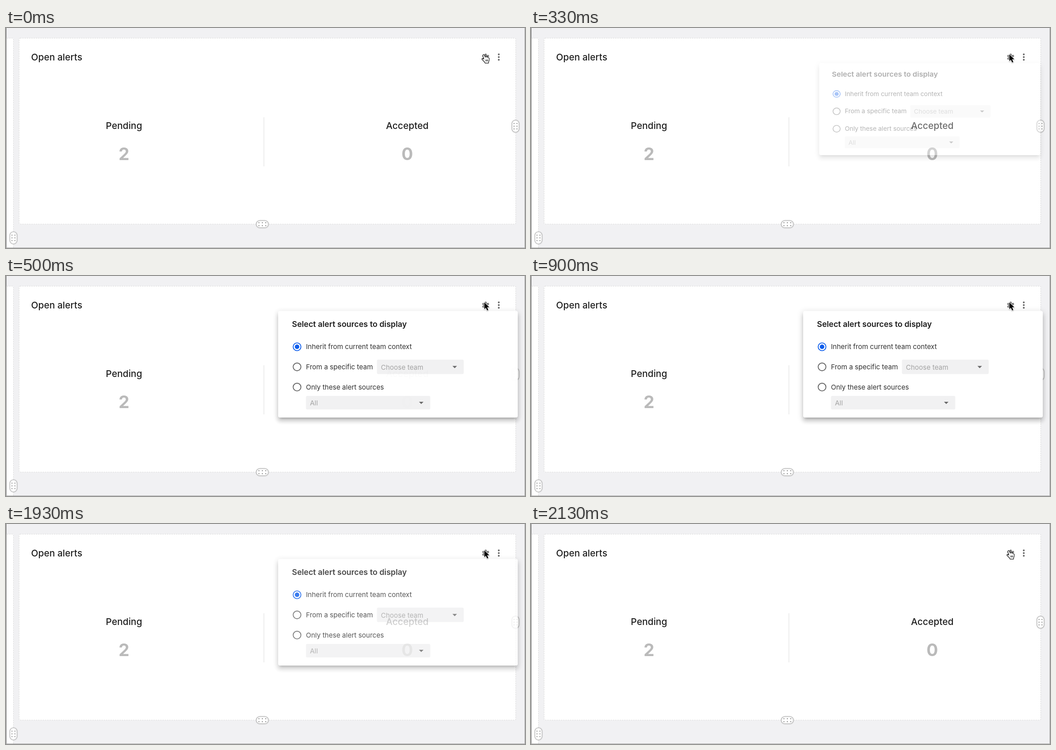
These frames come from a looping animation (1148x488 px, 2.43 s). An HTML page with a canvas:

```html
<!DOCTYPE html>
<html lang="en">
<head>
<meta charset="utf-8">
<title>Open alerts</title>
<style>
  html, body { margin: 0; width: 100%; height: 100%; overflow: hidden; background: #f1f1f3; }
  canvas { display: block; }
</style>
</head>
<body>
<canvas id="stage" width="1148" height="488"></canvas>
<script>
const W = 1148, H = 488, LOOP = 2430, TICK = 100 / 3;
const OPEN_AT = 247, CLOSE_AT = 1865, DURATION = 293;
const PANEL = { x: 602, y: 77.5, w: 530, h: 236.5 };
const ORIGIN = { x: 1061, y: 77.5 };

const stage = document.getElementById('stage').getContext('2d');
const layerCanvas = document.createElement('canvas');
layerCanvas.width = W;
layerCanvas.height = H;
const layer = layerCanvas.getContext('2d');

const clamp = v => Math.min(1, Math.max(0, v));

// cubic-bezier(.4, 0, .2, 1), solved by bisection
function ease(x) {
  x = clamp(x);
  let lo = 0, hi = 1;
  for (let i = 0; i < 24; i++) {
    const t = (lo + hi) / 2, u = 1 - t;
    if (1.2 * u * u * t + 0.6 * u * t * t + t * t * t < x) lo = t; else hi = t;
  }
  return lo * lo * (3 - 2 * lo);
}

function text(c, str, x, y, size, weight, color, align = 'left') {
  c.font = `${weight} ${size}px Inter, sans-serif`;
  c.textAlign = align;
  c.fillStyle = color;
  c.fillText(str, x, y);
}

function box(c, x, y, w, h, r, fill, stroke) {
  c.beginPath();
  c.roundRect(x, y, w, h, r);
  if (fill) { c.fillStyle = fill; c.fill(); }
  if (stroke) { c.strokeStyle = stroke; c.stroke(); }
}

function disc(c, x, y, r, fill) {
  c.beginPath();
  c.arc(x, y, r, 0, 2 * Math.PI);
  c.fillStyle = fill;
  c.fill();
}

function ring(c, x, y, r, width, color) {
  c.beginPath();
  c.arc(x, y, r, 0, 2 * Math.PI);
  c.lineWidth = width;
  c.strokeStyle = color;
  c.stroke();
}

function card(x, y, w, h) {
  stage.save();
  stage.lineWidth = 1;
  stage.setLineDash([3, 2]);
  box(stage, x, y, w, h, 2, '#fff', '#dadada');
  stage.restore();
}

function handle(x, y, cols, rows) {
  const upright = rows > cols, w = upright ? 16 : 27, h = upright ? 27 : 16;
  stage.save();
  stage.lineWidth = 1.2;
  stage.shadowColor = 'rgba(0,0,0,.2)';
  stage.shadowBlur = 2;
  box(stage, x - w / 2, y - h / 2, w, h, 8, '#fff', '#bdbdbd');
  stage.restore();
  const dx = upright ? 6.5 : 7.5, dy = upright ? 6 : 6.5;
  for (let i = 0; i < cols; i++)
    for (let j = 0; j < rows; j++)
      disc(stage, x + (i - (cols - 1) / 2) * dx, y + (j - (rows - 1) / 2) * dy, 1.1, '#777');
}

function gear(x, y) {
  stage.save();
  stage.translate(x, y);
  stage.fillStyle = '#777';
  for (let i = 0; i < 6; i++) {
    stage.rotate(Math.PI / 3);
    stage.fillRect(-2, -8, 4, 5);
  }
  ring(stage, 0, 0, 4.4, 3, '#777');
  stage.restore();
}

function drawBoard() {
  stage.fillStyle = '#f1f1f3';
  stage.fillRect(0, 0, W, H);
  card(-20, 22.5, 36.5, 500);
  card(29, 22.5, 1098.5, 412.5);
  stage.fillStyle = '#ddd';
  stage.fillRect(570, 198, 1, 109);

  text(stage, 'Open alerts', 55.5, 72.3, 20.5, 500, '#1f1f1f');
  text(stage, 'Pending', 261, 224, 20.5, 500, '#1f1f1f', 'center');
  text(stage, 'Accepted', 887.5, 224, 20.5, 500, '#1f1f1f', 'center');
  text(stage, '2', 261, 293, 38, 700, '#bababa', 'center');
  text(stage, '0', 887.5, 293, 38, 700, '#bababa', 'center');

  gear(1061, 65);
  for (const y of [58.5, 64.5, 70.5]) disc(stage, 1090, y, 2, '#666');
  handle(1127, 217.8, 2, 3);
  handle(567, 435.2, 3, 2);
  handle(16.5, 465.5, 2, 3);

  stage.fillStyle = '#6b6b6b';
  stage.fillRect(0, 0, 1, H);
  stage.fillStyle = '#a4a4a4';
  stage.fillRect(0, H - 1, W, 1);
  stage.fillRect(W - 1, 0, 1, H);
}

function panelShadow(dy, blur, spread, alpha) {
  layer.save();
  layer.shadowColor = `rgba(0,0,0,${alpha})`;
  layer.shadowBlur = blur;
  layer.shadowOffsetX = 3000;
  layer.shadowOffsetY = dy;
  layer.translate(-3000 / layer.getTransform().a, 0);
  box(layer, PANEL.x - spread, PANEL.y - spread, PANEL.w + 2 * spread, PANEL.h + 2 * spread, 4, '#000');
  layer.restore();
}

function radio(y, label, on) {
  ring(layer, 643.8, y, 8.6, 1.9, on ? '#0b5cec' : '#666');
  if (on) disc(layer, 643.8, y, 5, '#0b5cec');
  text(layer, label, 663.5, y + 5.3, 15, 400, '#2f2f2f');
}

function select(x, y, w, h, label, arrowX) {
  box(layer, x, y, w, h, 3, '#f1f1f2');
  const mid = y + h / 2;
  text(layer, label, x + 8.7, mid + 6, 15, 400, '#a3a3a3');
  layer.beginPath();
  layer.moveTo(arrowX - 5, mid - 2);
  layer.lineTo(arrowX + 5, mid - 2);
  layer.lineTo(arrowX, mid + 3);
  layer.fillStyle = '#686868';
  layer.fill();
}

function drawPanel(opacity, grow) {
  const sx = 0.75 + 0.25 * grow, sy = 0.5625 + 0.4375 * grow;
  layer.setTransform(1, 0, 0, 1, 0, 0);
  layer.clearRect(0, 0, W, H);
  layer.setTransform(sx, 0, 0, sy, ORIGIN.x * (1 - sx), ORIGIN.y * (1 - sy));

  panelShadow(5, 5, -3, 0.2);
  panelShadow(8, 10, 1, 0.14);
  panelShadow(3, 14, 2, 0.12);
  box(layer, PANEL.x, PANEL.y, PANEL.w, PANEL.h, 4, '#fff');

  text(layer, 'Select alert sources to display', 632.5, 113.3, 17.5, 600, '#1c1c1c');
  radio(157, 'Inherit from current team context', true);
  radio(201.6, 'From a specific team', false);
  select(820.5, 185.5, 192, 32, 'Choose team', 992.5);
  radio(246.3, 'Only these alert sources', false);
  select(663.5, 266, 275, 30, 'All', 918.5);

  stage.globalAlpha = opacity;
  stage.drawImage(layerCanvas, 0, 0);
  stage.globalAlpha = 1;
}

const ARROW = new Path2D('M1058 58.5V73.5L1061.4 70.3L1064.2 76.6L1066.9 75.4L1064.1 69.3H1069Z');
const HAND = new Path2D(`M1057 69L1054.8 62Q1054.3 59.5 1056 59Q1057.8 58.6 1058.6 61L1060 65
  Q1060.3 63 1062 63.2Q1063.6 63.4 1063.8 65Q1064.5 63.8 1066 64.3Q1067.2 64.8 1067.2 66.3
  Q1069 66 1069 68.5Q1069.3 72 1067.6 75L1067.4 77.8H1059.5L1059 76Q1056 73 1052.8 69.5
  Q1052.3 67.8 1053.8 67.6Q1055.3 67.8 1057 69Z`);
const HAND_LINES = new Path2D('M1061.3 70V74M1063.5 70V74M1065.7 70V74');

function drawCursor(pointing) {
  stage.save();
  stage.lineJoin = 'round';
  if (pointing) {
    stage.fillStyle = '#fff';
    stage.fill(HAND);
    stage.strokeStyle = '#111';
    stage.lineWidth = 1.2;
    stage.stroke(HAND);
    stage.lineWidth = 1;
    stage.stroke(HAND_LINES);
  } else {
    stage.shadowColor = 'rgba(0,0,0,.3)';
    stage.shadowBlur = 2;
    stage.shadowOffsetY = 1;
    stage.strokeStyle = '#fff';
    stage.lineWidth = 2;
    stage.stroke(ARROW);
    stage.shadowColor = 'transparent';
    stage.fillStyle = '#000';
    stage.fill(ARROW);
  }
  stage.restore();
}

function drawClick(t) {
  if (t >= 130 && t < 200 || t >= 1760 && t < 1830) ring(stage, 1057.8, 60.6, 23.6, 1.7, '#111');
  else if (t >= 200 && t < 230) ring(stage, 1057.8, 60.6, 33.5, 1.5, 'rgba(17,17,17,.25)');
}

function draw(time) {
  const t = Math.floor((time + 3.5) / TICK) * TICK;
  drawBoard();
  if (t >= OPEN_AT && t < 2130) {
    if (t < 530) {
      const x = (t - OPEN_AT) / DURATION;
      drawPanel(ease(x), ease(x * 1.5));
    } else {
      const x = (t - CLOSE_AT) / DURATION;
      drawPanel(1 - ease(x), 1 - ease((x - 1 / 3) * 1.5));
    }
  }
  drawClick(t);
  drawCursor(t < OPEN_AT || t >= 2130);
}

const start = performance.now();
function loop() {
  draw((performance.now() - start) % LOOP);
  requestAnimationFrame(loop);
}
loop();
</script>
</body>
</html>
```
